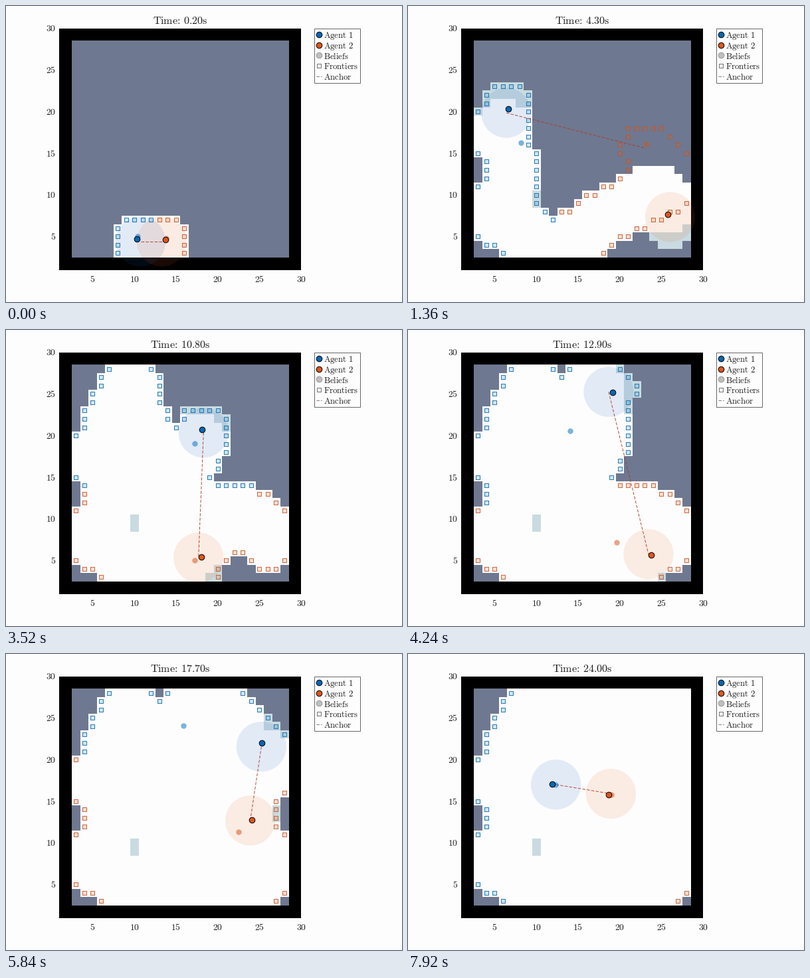
Write a matplotlib script that moves like this. It is 596x446 px and loops after 8 s.

```python
import numpy as np
import matplotlib.pyplot as plt
from matplotlib.animation import FuncAnimation
from matplotlib.patches import Circle, Rectangle

plt.rcParams["mathtext.fontset"] = "cm"

W, H, N = 596, 446, 100
BLUE, ORANGE = "#0072bd", "#d95319"
PAPER, UNKNOWN, TEAL = "#fdfdfd", "#6e7890", "#c9dbe0"
CELL = 12.55
SENSE = 3.55          # range within which cells get explored
LEAD = .5             # markers run half a step ahead of their discs
LOST, FOUND = 7, 40   # steps between which the agents are out of contact
MEETINGS = [0, 17, 28, 44, 62, 84, 99, 100]


def px(x):
    return 67.6 + CELL * np.asarray(x)


def py(y):
    return 33.6 + CELL * (30 - np.asarray(y))


def rgb(color):
    return [int(color[i:i + 2], 16) / 255 for i in (1, 3, 5)]


# ---- motion --------------------------------------------------------------
def route(*legs):
    """Path through the legs, one per interval, at even speed within each."""
    times, points = [0], [legs[0][0]]
    for leg, t0, t1 in zip(legs[1:], MEETINGS, MEETINGS[1:]):
        corners = np.array([points[-1], *leg])
        travelled = np.cumsum(np.hypot(*np.diff(corners, axis=0).T))
        times += list(t0 + (t1 - t0) * travelled / travelled[-1])
        points += leg
    xs, ys = np.transpose(points)
    return lambda t: np.array([np.interp(t, times, xs), np.interp(t, times, ys)])


path1 = route(
    [(10.75, 4.4)],
    [(9.6, 5.3), (7.8, 5.7), (6.2, 6.4), (6.2, 9.7), (7, 10.6), (6.9, 13.2),
     (6.3, 16), (6.4, 19.85)],
    [(8.1, 23.7), (9.3, 25.8), (10.1, 25.5), (10.5, 22.8), (11.05, 21.15)],
    [(11.4, 18.2), (14, 16.9), (17, 17.6), (18.3, 20.35)],
    [(16.3, 24), (16.3, 25.6), (21.7, 24.8), (20.95, 19.75)],
    [(21.5, 17.5), (25, 17.8), (25.5, 25.6), (20, 26.25)],
    [(15.8, 26), (12.35, 17)],
    [(11.4, 17.1)])
path2 = route(
    [(13.3, 4.4)],
    [(22.4, 9.6), (24.7, 9.9), (26.05, 7.35)],
    [(24.6, 9), (23, 10.9), (18.3, 10.8)],
    [(13.2, 11.6), (13.4, 8.7), (17.7, 5.35)],
    [(22.5, 6), (25.3, 5.3), (25, 7), (23.6, 8.7)],
    [(23.3, 12.3), (25.2, 13.5), (22.4, 13.5)],
    [(19.5, 12.5), (20.8, 16), (18.95, 15.9)],
    [(18.4, 15.7)])
# Where each agent believes the other to be
guess1 = route([(10.5, 4.7)], [(8, 16.2)], [(10.85, 17.5)], [(17.4, 19)],
               [(11, 21.9)], [(20.3, 26.1)], [(12.35, 17)], [(12.3, 17)])
guess2 = route(
    [(13.3, 4.5)],
    [(20.3, 8.3), (25.6, 11.1), (25, 13.5), (23.1, 15.6)],
    [(24, 20.5), (23.7, 22.3), (22.2, 20.5), (21.85, 18.3)],
    [(17.15, 4.9)], [(21.85, 9.2)], [(23.1, 13.2)], [(19, 15.8)], [(19, 15.8)])


# ---- exploration ---------------------------------------------------------
yy, xx = np.mgrid[0:31, 0:31]
room = (xx > 2) & (xx < 29) & (yy > 2) & (yy < 29)


def first_seen(path, start=0, end=N):
    """Time at which each cell first comes within range of the path."""
    times = np.arange(start, end, .2)
    x, y = path(times)[:, :, None, None]
    near = np.hypot(xx - x, yy - y) <= SENSE
    return np.where(near.any(0), times[near.argmax(0)], np.inf)


seen1, seen2 = first_seen(path1), first_seen(path2)
seen = np.minimum(seen1, seen2)
imagined = first_seen(guess2, LOST, FOUND)
half_seen = (xx == 10) & ((yy == 9) | (yy == 10))


def apart(n):
    return LOST <= n < FOUND


def map_image(n):
    image = np.empty((31, 31, 3))
    image[:] = rgb(PAPER)
    fresh = (seen > 0) & (n - seen < 1.6)
    image[fresh | half_seen] = rgb(TEAL)
    image[seen > n] = rgb(UNKNOWN)
    return image[3:29, 3:29]


def frontiers(n):
    """Known cells beside unknown ones in agent 1's view, split by agent."""
    known = seen <= n
    if apart(n):
        known = (seen1 <= n) | (seen2 <= LOST) | (imagined <= n)
    u = room & ~known
    edge = np.zeros_like(u)
    edge[1:-1, 1:-1] = u[2:, 1:-1] | u[:-2, 1:-1] | u[1:-1, 2:] | u[1:-1, :-2]
    y, x = np.nonzero(edge & room & known)
    cells = np.column_stack([x, y])
    mate = guess2 if apart(n) else path2
    to_first, to_second = (np.hypot(*(cells - p(n + LEAD)).T) for p in (path1, mate))
    second = to_second < to_first
    return cells[~second], cells[second]


# ---- drawing -------------------------------------------------------------
def pt(pixels):
    return pixels * 0.72


def roman(text):
    text = text.replace(": ", r"\!:\,").replace(" ", r"\ ")
    return rf"$\mathrm{{{text}}}$"


fig = plt.figure(figsize=(W / 100, H / 100), dpi=100, facecolor=PAPER)
ax = fig.add_axes([0, 0, 1, 1])
ax.axis("off")


def label(x, y, text, size, ha="center"):
    return ax.text(x, y, roman(text), fontsize=pt(size), ha=ha,
                   va="center_baseline", color="#1c1c1c")


def dots(color, diameter, marker="o", at=(), **style):
    return ax.scatter(*(at or ([], [])), s=pt(diameter) ** 2, marker=marker,
                      facecolor=color, **style)


def place(artist, cells):
    cells = np.reshape(cells, (-1, 2))
    artist.set_offsets(np.column_stack([px(cells[:, 0]), py(cells[:, 1])]))


ax.add_patch(Rectangle((px(1), py(30)), CELL * 29, CELL * 29, color="black", lw=0))
grid_image = ax.imshow(map_image(0), origin="lower", interpolation="nearest",
                       aspect="auto", zorder=2,
                       extent=(px(2.5), px(28.5), py(2.5), py(28.5)))
ax.set(xlim=(0, W), ylim=(H, 0))

discs = [ax.add_patch(Circle((0, 0), CELL * 3, color=c, alpha=.115, lw=0, zorder=3))
         for c in ("#1258c0", "#eb601b")]
squares = [dots((*rgb(face), .18), 6.4, "s", edgecolor=(*rgb(edge), .88),
                linewidth=pt(1.05), zorder=4)
           for face, edge in (("#008ccc", "#146cac"), ("#f2661a", "#c4562a"))]
anchor, = ax.plot([], [], color="#b03a28", lw=pt(.9), dashes=(5, 2.5), zorder=5)
beliefs = [dots(c, 8.4, alpha=.52, linewidth=0, zorder=6) for c in (BLUE, ORANGE)]
agents = [dots(c, 8.6, edgecolor="black", linewidth=pt(1), zorder=7)
          for c in ("#0468b8", "#dd561c")]

for v in range(5, 31, 5):
    label(px(v), 411, str(v), 13.6)
    label(74.8, py(v) - .8, str(v), 13.6, "right")
title = label(262.8, 21.3, "Time: 0.20s", 16)

ax.add_patch(Rectangle((463.5, 33.5), 69, 82.5, fc=PAPER, ec="#444444", lw=pt(.8)))
for i, (name, face, edge, marker) in enumerate([
        ("Agent 1", "#0468b8", "black", "o"), ("Agent 2", "#dd561c", "black", "o"),
        ("Beliefs", "#bfbfbf", "#999999", "o"),
        ("Frontiers", "#f1f1f1", "#777777", "s"), ("Anchor", None, None, None)]):
    row = 42.8 + 15.75 * i
    label(478.3, row - .3, name, 12.8, "left")
    if marker:
        dots(face, 8.6 if marker == "o" else 6.4, marker, ([471.2], [row]),
             edgecolor=edge, linewidth=pt(1), zorder=4)
    else:
        ax.plot([467, 476], [row, row], color="#8a6a64", lw=pt(.9), dashes=(5, 2, 2, 2))


def update(n):
    title.set_text(roman(f"Time: {round(.2 + n * 23.8 / 99, 1):.2f}s"))
    grid_image.set_data(map_image(n))
    for disc, path in zip(discs, (path1, path2)):
        x, y = path(n)
        disc.center = px(x), py(y)
    for artist, cells in zip(squares, frontiers(n)):
        place(artist, cells)
    for artist, path in zip(beliefs + agents, (guess1, guess2, path1, path2)):
        place(artist, path(n + LEAD))
    x, y = np.transpose([path1(n), (guess2 if apart(n) else path2)(n)])
    anchor.set_data(px(x), py(y))
    return []


anim = FuncAnimation(fig, update, frames=N, interval=80, repeat=True, repeat_delay=0)
plt.show()
```
